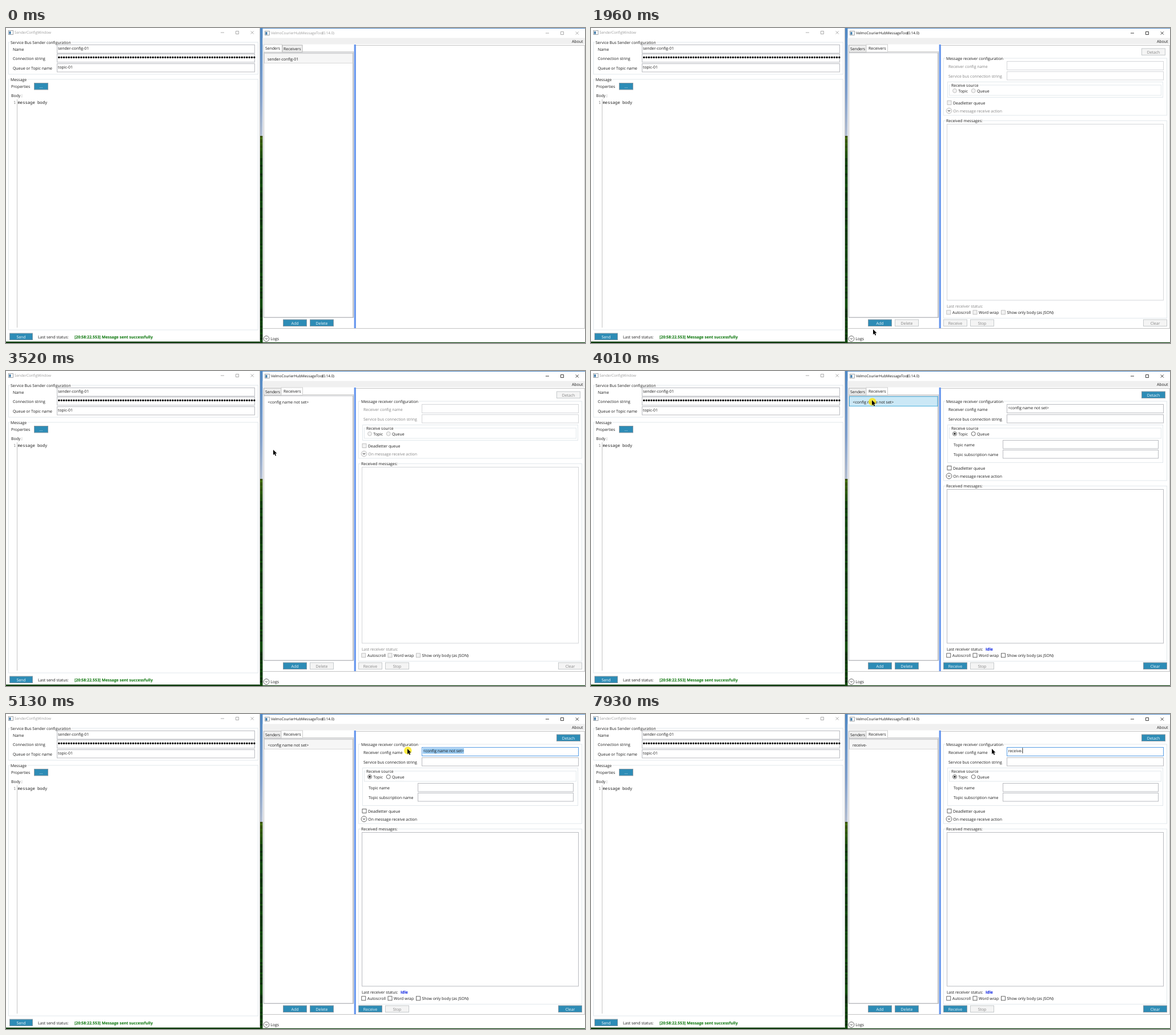
An HTML page that plays this animation: 1014 px wide and 552 px high, repeating every 8 s.

```html
<!DOCTYPE html>
<html lang="en">
<head>
<meta charset="utf-8">
<title>Message tool</title>
<style>
html, body { margin: 0; width: 100%; height: 100%; overflow: hidden; background: #fff; }
svg { display: block; width: 1014px; height: 552px; }
text { font: 6.9px "Open Sans", "Noto Sans", sans-serif; fill: #1a1a1a; text-rendering: geometricPrecision; }
.title { font-size: 6.35px; fill: #999; }
.active .title { fill: #111; }
.glyph { fill: none; stroke: #999; stroke-width: .8; }
.active .glyph { stroke: #111; }
.head { paint-order: stroke; stroke: #fff; stroke-width: 3px; }
.dim { fill: #838383; }
.bold { font-weight: 700; }
.green { fill: #007000; }
.blue { fill: #0018e0; }
.mono { font: 7.2px "Noto Sans Mono", "DejaVu Sans Mono", monospace; }
.mid { text-anchor: middle; }
.btn { fill: #2d8cb6; stroke: #8b9ba6; }
.btn + text { fill: #f2f8fb; }
.btn.off { fill: #f4f4f4; stroke: #c6cacc; }
.btn.off + text { fill: #838383; }
.btn.over { fill: #bee6fd; stroke: #3c7fb1; }
.btn.down { fill: #c4e5f6; stroke: #2c628b; }
.box { fill: #fff; stroke: #b9bbc0; }
.box.off { stroke: #d4d6d9; }
.box.focus { stroke: #569de5; }
.group { fill: none; stroke: #e2e8ec; }
.tab { fill: #f0f0f0; stroke: #b4b4b4; }
.tab.sel { fill: #fff; stroke: #cfcfcf; }
.tab.over { fill: #e4f1fc; stroke: #7eb4ea; }
.row { fill: none; stroke: none; }
.row.idle { fill: #f6f6f6; stroke: #dadada; }
.row.over { fill: #e4f4fb; stroke: #8fcdec; }
.row.sel { fill: #cbe8f6; stroke: #4aaede; }
.ring { fill: #fff; stroke: #444; stroke-width: .8; }
.ring.off { fill: #f2f2f2; stroke: #b5b5b5; }
.line { fill: none; stroke: #c4c4c4; }
</style>
</head>
<body>
<svg id="stage" viewBox="0 0 1014 552"></svg>
<script>
const LOOP = 8000;
const WORD = "receive-";
const UNSET = "<config name not set>";
const TYPED = [5400, 5530, 5800, 6010, 6610, 7460, 7730, 7930];
const BLINK = 530;
const FIELD_X = 730.5;

// Pointer path: time, x, y
const PATH = [
  [370, 901, 403], [1140, 500, 36.5], [1560, 500, 36.5], [1910, 494, 528],
  [2260, 505, 514], [2980, 505, 514], [3520, 468, 138], [3800, 480, 65],
  [3940, 492, 51], [4150, 492, 51], [4640, 807, 62], [4710, 807, 62],
  [5130, 703, 61], [5270, 702, 61]
];
const PRESSES = [[1280, 1410], [2640, 2840], [3940, 4150], [4710, 5210]];

const esc = s => s.replace(/</g, "&lt;").replace(/>/g, "&gt;");
const text = (x, y, s, cls = "", id = "") =>
  `<text x="${x}" y="${y}" class="${cls}" id="${id}">${esc(s)}</text>`;
const rect = (x, y, w, h, cls, id = "") =>
  `<rect x="${x}" y="${y}" width="${w}" height="${h}" class="${cls}" id="${id}"/>`;
const fill = (x, y, w, h, color) =>
  `<rect x="${x}" y="${y}" width="${w}" height="${h}" fill="${color}"/>`;
const path = (d, cls) => `<path d="${d}" class="${cls}"/>`;
const button = (x, y, w, s, on = true, id = "") =>
  rect(x + .5, y + .5, w - 1, 11.5, on ? "btn" : "btn off", id) +
  text(x + w / 2, y + 9, s, "mid");
const group = (x, y, w, h, label, tx) =>
  rect(x, y, w, h, "group") + text(tx, y + 2.5, label, "head");
const check = (x, y, s, on) =>
  rect(x + .5, y + .5, 7, 7, on ? "ring" : "ring off") + text(x + 10.5, y + 6.7, s);
const radio = (x, y, s, on, dot) =>
  `<circle cx="${x}" cy="${y}" r="3.5" class="ring ${on ? "" : "off"}"/>` +
  (dot ? `<circle cx="${x}" cy="${y}" r="1.8" fill="#222"/>` : "") +
  text(x + 6.3, y + 3, s);
const expander = (x, y, s, on = true) =>
  `<circle cx="${x}" cy="${y}" r="4.9" class="ring ${on ? "" : "off"}"/>` +
  `<path d="M${x - 2} ${y - 1}l2 2 2-2" fill="none" stroke="#333"/>` +
  text(x + 7.3, y + 2.6, s, on ? "" : "dim");
const caption = (x, y, s) =>
  `<g transform="translate(${x} ${y})"><rect x=".5" y="-3.5" width="8" height="7" fill="#fff" stroke="#8a8f94" stroke-width=".8"/>` +
  fill(1.5, -2, 3, 4.6, "#3b78a8") + "</g>" + text(x + 11, y + 2.4, s, "title");
const controls = (x, y) => path(
  `M${x - 3} ${y}h6M${x + 23.5} ${y - 2.5}h5v5h-5zM${x + 49.7} ${y - 2.6}l5.2 5.2m0-5.2l-5.2 5.2`, "glyph");

function backdrop() {
  let seed = 7, out = `<defs><linearGradient id="sky" x2="0" y2="1">
    <stop stop-color="#4f88c4"/><stop offset=".6" stop-color="#7f9fcc"/><stop offset="1" stop-color="#b4bfd2"/>
    </linearGradient></defs>` + fill(0, 0, 1014, 552, "#0c3a0b") + fill(445, 0, 569, 189, "url(#sky)");
  const rnd = () => (seed = seed * 16807 % 2147483647) / 2147483647;
  for (let y = 189; y < 550; y += 3) {
    const lift = y < 235 ? 40 * (1 - (y - 189) / 46) : 0;
    const g = 42 + rnd() * 38 + lift;
    out += fill(445, y, 4.5, 3, `rgb(${g * .25 + lift | 0},${g | 0},10)`);
  }
  return out;
}

function senderWindow() {
  return fill(0, 0, 445, 549.5, "#fff") + path("M444.5 0V549.5", "line") +
    caption(4, 8, "SenderConfigWindow") + controls(379, 8) +
    group(4.5, 25, 437, 56, "Service Bus Sender configuration", 8) +
    text(12, 40, "Name") + text(12, 56, "Connection string") + text(12, 72.5, "Queue or Topic name") +
    [29.5, 45.5, 62.5].map(y => rect(89.5, y, 346, 14.5, "box")).join("") +
    text(91, 37.7, "sender-config-01") + text(91, 70.5, "topic-01") +
    `<path d="M92.8 51.6H435" stroke="#000" stroke-width="3.5" stroke-linecap="round" stroke-dasharray="0 4.33"/>` +
    group(4.5, 90, 437, 439, "Message", 8) +
    text(9, 105.3, "Properties") + button(49, 96, 25, "...") + text(9, 120.5, "Body :") +
    text(13, 132.5, "1", "mono dim") + text(20.5, 132.5, "message body", "mono") +
    path("M19.5 125V525", "line") +
    button(6, 534.5, 41, "Send") + text(56, 543.5, "Last send status:") +
    text(120, 543.5, "[20:58:22.553] Message sent successfully", "bold green");
}

function receiverPanel(on) {
  const d = on ? 39 : 0, off = on ? "" : " off", tone = on ? "" : "dim";
  let out = button(964, 35.5, 42, "Detach", on) +
    group(617.5, 53, 391, 100 + d, "Message receiver configuration", 622) +
    text(626, 69.5, "Receiver config name", tone) +
    text(626, 87, "Service bus connection string", tone) +
    rect(728.5, 58.5, 274, 15, "box" + off, on ? "field" : "") +
    rect(728.5, 76.5, 274, 14.5, "box" + off) +
    rect(624.5, 94.5, 377, 27 + d, "group") +
    group(627.5, 100, 371, 18, "Receive source", 631) +
    radio(637, 110, "Topic", on, on) + radio(669.7, 110, "Queue", on) +
    check(623.5, 127 + d, "Deadletter queue", on) +
    expander(627, 145 + d, "On message receive action", on) +
    group(617.5, 162.5 + d, 391, 346 - d, "Received messages:", 622) +
    rect(623.5, 168.5 + d, 379, 308.5 - d, "box" + off) +
    text(623, 489.7, "Last receiver status:", tone) +
    check(622.3, 494.3, "Autoscroll", on) + check(668.5, 494.3, "Word wrap", on) +
    check(718, 494.3, "Show only body (as JSON)", on) +
    button(617, 510.5, 42, "Receive", on) + button(664, 510.5, 42, "Stop", false) +
    button(967, 510.5, 42, "Clear", on);
  if (on) out += text(635, 131.5, "Topic name") + text(635, 149, "Topic subscription name") +
    rect(721.5, 121.5, 272, 14.5, "box") + rect(721.5, 138.5, 272, 14.5, "box") +
    text(691, 489.7, "Idle", "bold blue") +
    rect(FIELD_X, 60, 0, 9.5, "", "mark") + text(FIELD_X, 67.4, UNSET, "", "value") +
    fill(0, 59.3, .8, 9.7, "#000").replace("<rect", '<rect id="caret"');
  return out;
}

function mainWindow() {
  return `<g id="main">` + fill(449.5, 1, 564.5, 549.8, "#fff") +
    caption(453, 9, "VelmoCourierHubMessageTool") +
    text(575, 11.4, "(0.14.0)", "title").replace("<text", '<text text-anchor="end" ') + controls(948, 9) +
    fill(449.5, 17.5, 564.5, 11, "#f0f0f0") + text(991, 26, "About") +
    path("M450 526.5H1014M1013.5 30V526M613 30.5H1013", "line") +
    fill(609.6, 29, 3.2, 497, "#6495ed") +
    rect(451.5, 41.5, 157, 466, "line") +
    rect(451.5, 29, 32, 13, "tab", "tabA") + text(454, 38.2, "Senders", "", "nameA") +
    rect(484, 30, 35, 12, "tab", "tabB") + text(486, 39, "Receivers", "", "nameB") +
    rect(451.5, 43.5, 156, 463.5, "box") +
    rect(452.5, 44.8, 154.5, 16.8, "row", "row") + text(458, 56.5, "", "", "item") +
    button(485, 510.5, 42, "Add", true, "add") +
    `<g id="delOn">${button(532, 510.5, 42, "Delete")}</g><g id="delOff">${button(532, 510.5, 42, "Delete", false)}</g>` +
    `<g id="panelOff">${receiverPanel(false)}</g><g id="panelOn">${receiverPanel(true)}</g>` +
    expander(456, 544.5, "Logs") + "</g>";
}

const pointer = `<g id="pointer"><circle id="halo" cx=".8" cy="3" r="6.8" fill="#ffe600" opacity=".75"/>
  <path id="arrow" d="M0 0V9.2L2.1 7.2 3.7 10.8 5.2 10.1 3.6 6.6H6.5Z" fill="#000" stroke="#fff" stroke-width=".5" paint-order="stroke"/>
  <path id="beam" d="M-1.5-2.5H1.5M0-2.5V7.5M-1.5 7.5H1.5" fill="none" stroke="#111" stroke-width=".8"/></g>`;

const stage = document.getElementById("stage");
stage.innerHTML = backdrop() + senderWindow() + mainWindow() + pointer;

const el = id => document.getElementById(id);
const show = (id, on) => el(id).style.display = on ? "" : "none";
const cls = (id, name) => el(id).setAttribute("class", name);
const set = (id, attrs) => { for (const k in attrs) el(id).setAttribute(k, attrs[k]); };
el("mark").style.fill = "#94c6ee";

function pointerAt(t) {
  const q = Math.floor((t - 20) / 70) * 70 + 20;
  let i = 0;
  while (i < PATH.length - 1 && PATH[i + 1][0] <= q) i++;
  const a = PATH[i], b = PATH[i + 1] || a;
  const u = b === a ? 0 : Math.max(0, (q - a[0]) / (b[0] - a[0]));
  const e = u * u * (3 - 2 * u);
  return [a[1] + (b[1] - a[1]) * e, a[2] + (b[2] - a[2]) * e];
}

function render(t) {
  const [x, y] = pointerAt(t);
  const seen = t >= 390;
  const inside = (l, top, r, bottom) => seen && x >= l && x <= r && y >= top && y <= bottom;
  const down = PRESSES.some(([a, b]) => t >= a && t < b);
  const second = t >= 1410, added = t >= 2840, picked = t >= 4010, focus = t >= 4710;
  const count = TYPED.filter(k => t >= k).length;
  const label = count ? WORD.slice(0, count) : UNSET;

  cls("main", t >= 1280 ? "active" : "");
  set("tabA", second ? { y: 30, width: 30.5, height: 12 } : { y: 29, width: 32, height: 13 });
  set("tabB", second ? { x: 482, y: 29, width: 37.5, height: 13 } : { x: 484, y: 30, width: 35, height: 12 });
  cls("tabA", second ? "tab" : "tab sel");
  cls("tabB", second ? "tab sel" : inside(484, 30, 519, 42) ? "tab over" : "tab");
  set("nameA", { y: second ? 39 : 38.2 });
  set("nameB", { y: second ? 38.2 : 39 });

  el("item").textContent = !second ? "sender-config-01" : added ? label : "";
  set("item", { x: added && !count ? 458.6 : 458 });
  const over = added && inside(452, 44, 607, 62);
  cls("row", "row " + (!second || focus ? "idle" : picked ? "sel" : over ? "over" : ""));

  const onAdd = inside(485, 510, 527, 522.5);
  cls("add", "btn" + (onAdd ? down ? " down" : " over" : ""));
  show("delOn", !second || picked);
  show("delOff", second && !picked);
  show("panelOff", second && !picked);
  show("panelOn", picked);

  const onField = picked && inside(728, 58, 1003, 74);
  cls("field", focus || onField ? "box focus" : "box");
  el("value").textContent = label;
  const end = picked ? FIELD_X + el("value").getComputedTextLength() : FIELD_X;
  const from = Math.min(end, Math.max(FIELD_X - .5, x));
  set("mark", { x: from, width: focus && !count ? end - from : 0 });
  set("caret", { x: end });
  show("caret", count && t - TYPED[count - 1] < BLINK);

  show("pointer", seen);
  show("halo", down);
  show("arrow", !onField);
  show("beam", onField);
  set("pointer", { transform: `translate(${x} ${y})` });
}

const start = performance.now();
function tick() {
  render((performance.now() - start) % LOOP);
  requestAnimationFrame(tick);
}
tick();
</script>
</body>
</html>
```
